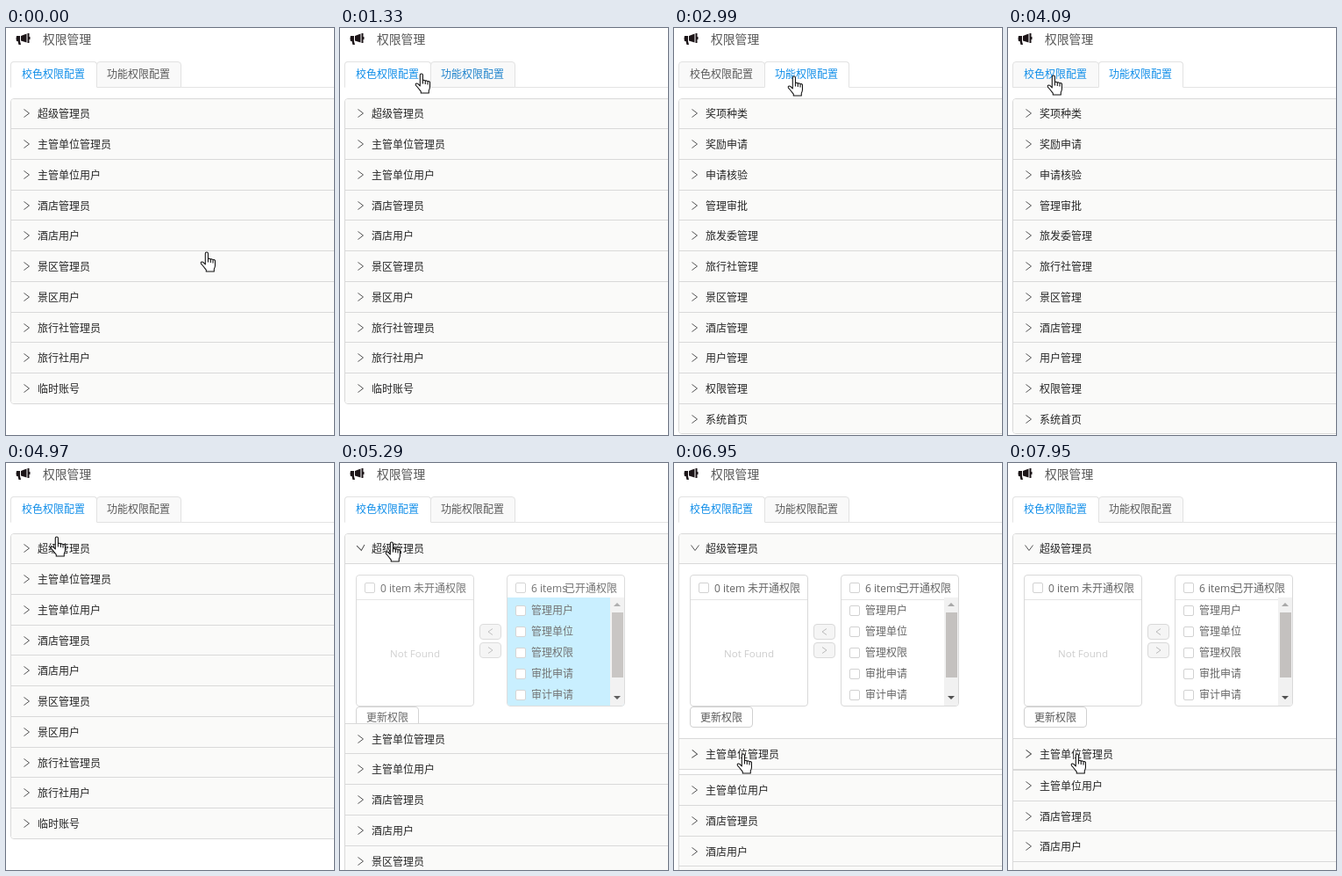
An HTML page for the animation above (8000 ms loop, 374x463 px).

```html
<!DOCTYPE html>
<html lang="zh-CN">
<head>
<meta charset="utf-8">
<title>权限管理</title>
<style>
  html, body { margin: 0; width: 100%; height: 100%; overflow: hidden; background: #fff; }
  body { font: 12px/24px "Open Sans", "Noto Sans CJK SC", "Noto Sans CJK", sans-serif; color: #666; }
  #stage { position: relative; width: 374px; height: 463px; overflow: hidden; }
  #stage div, #stage svg { position: absolute; box-sizing: border-box; white-space: nowrap; }
  svg { overflow: visible; }
  .title { left: 42px; top: 1px; font-size: 13.8px; color: #595959; }
  .rule { left: 5px; top: 67px; width: 369px; height: 1px; background: #e4e4e4; }
  .tab { top: 38px; height: 30px; line-height: 27px; border: 1px solid #e2e2e2; border-radius: 4px 4px 0 0; }
  .panels { left: 5px; top: 80px; width: 380px; border: 1px solid #d9d9d9; border-radius: 4px; overflow: hidden; }
  .row { left: 0; width: 100%; height: 35px; line-height: 33px;
         color: #262626; background: #fafaf9; border-top: 1px solid #d9d9d9; }
  .row .text { left: 30px; }
  .row svg { left: 12px; top: 10px; }
  .body { left: 0; width: 100%; overflow: hidden; background: #fff; border-top: 1px solid #d9d9d9; }
  .list { top: 12px; width: 135px; height: 150px; border: 1px solid #d9d9d9; border-radius: 4px; overflow: hidden; }
  .head { left: 0; top: 0; width: 100%; height: 28px; line-height: 29px; border-bottom: 1px solid #e4e4e4; }
  .head .name { right: 8px; }
  .items { left: 0; top: 25px; right: 0; bottom: 0; }
  .lit .items { background: #c4eeff; }
  .item { left: 0; height: 24px; width: 100%; }
  .label { left: 27px; top: 0; }
  .box { left: 9px; width: 12px; height: 12px; border: 1px solid #d2d2d2; border-radius: 2px; background: #fff; }
  .none { width: 100%; top: 77px; text-align: center; color: #ccc; font-size: 11.6px; }
  .bar { right: 0; top: 25px; width: 16px; bottom: 0; background: #f1f1f1; }
  .thumb { left: 2px; top: 17px; width: 13px; height: 74px; background: #c4c1bf; }
  .move { left: 153px; width: 25px; height: 18px; border: 1px solid #d9d9d9; border-radius: 4px; background: #f5f5f5; }
  .save { left: 12px; top: 162px; width: 72px; height: 24px; line-height: 24px; text-align: center;
          border: 1px solid #d0d0d0; border-radius: 4px; }
</style>
</head>
<body>
<div id="stage">
  <svg width="17" height="14" style="left:11px;top:6px" fill="#1c1518">
    <path d="M1 3h4v6H1q-1-3 0-6zM6 3L12.500.5v10L6 8.500zM2.500 9H5l1 4H3.500zM13.500 0h2v11h-2zM15.500 4h1v3h-1z"/>
  </svg>
  <div class="title">权限管理</div>
  <div class="rule"></div>
</div>
<script>
const LOOP = 8000, ROW = 34.72, TOP = 80, BODY = 199;
const GRAY = [89, 89, 89], BLUE = [16, 142, 233], LINE = [208, 208, 208];

const roles = ['超级管理员', '主管单位管理员', '主管单位用户', '酒店管理员', '酒店用户',
  '景区管理员', '景区用户', '旅行社管理员', '旅行社用户', '临时账号'];
const features = ['奖项种类', '奖励申请', '申请核验', '管理审批', '旅发委管理', '旅行社管理',
  '景区管理', '酒店管理', '用户管理', '权限管理', '系统首页'];
const rights = ['管理用户', '管理单位', '管理权限', '审批申请', '审计申请'];

// Screen refreshes come in bursts: first time, last time, count
const bursts = [[450, 1210, 8], [1330, 1670, 4], [1880, 2570, 7], [2750, 2990, 3],
  [3210, 3990, 8], [4090, 4420, 4], [4630, 5410, 8], [5570, 6300, 8],
  [6400, 6520, 2], [6830, 7170, 4], [7390, 7390, 1], [7840, 7950, 2]];
const ticks = [0];
for (const [a, b, n] of bursts)
  for (let i = 0; i < n; i++) ticks.push(n > 1 ? Math.floor((a + (b - a) * i / (n - 1)) / 10) * 10 : a);
const snap = t => ticks.filter(k => k <= t).pop();

// Pointer path: time, x, y
const path = [[0, 222, 253], [400, 222, 253], [450, 226, 250], [780, 185, 150], [1000, 125, 58],
  [1210, 112, 51], [1300, 97, 50], [1330, 86, 50], [1670, 34, 86], [1800, 34, 86], [2570, 130, 53],
  [2990, 130, 53], [3600, 90, 58], [3990, 46, 53], [4090, 45, 52], [4420, 45, 53], [5070, 52, 88],
  [5290, 52, 88], [5410, 52, 89], [5570, 75, 108], [5880, 247, 165], [6200, 72, 290],
  [6300, 66, 297], [6400, 70, 312], [6520, 72, 326], [6800, 72, 326], [6943, 72, 329], [8000, 72, 329]];

const clamp = v => Math.max(0, Math.min(1, v));
const ramp = (t, from, span) => clamp((t - from) / span);
const ease = p => p < .5 ? 4 * p ** 3 : 1 - 4 * (1 - p) ** 3;
const mix = (a, b, p) => `rgb(${a.map((v, i) => Math.round(v + (b[i] - v) * p))})`;

function pointer(t) {
  const i = Math.max(1, path.findIndex(k => k[0] >= t));
  const [t0, x0, y0] = path[i - 1], [t1, x1, y1] = path[i];
  const p = ramp(t, t0, t1 - t0);
  return [Math.round(x0 + (x1 - x0) * p), Math.round(y0 + (y1 - y0) * p)];
}

const zones = { tab1: [5, 38, 103, 67], tab2: [103, 38, 200, 67], save: [18, 277, 90, 301] };
function over(name, t) {
  const [x, y] = pointer(t), [l, u, r, d] = zones[name];
  return x + 7 >= l && x + 7 < r && y >= u && y < d;
}
// Hover colour fades over the last 200 ms
function heat(name, t) {
  let n = 0;
  for (let k = 0; k < 10; k++) n += over(name, t - k * 20);
  return n / 10;
}

const stage = document.getElementById('stage');
function add(parent, cls, text = '', style = '') {
  const el = document.createElement('div');
  el.className = cls;
  el.textContent = text;
  el.style.cssText = style;
  parent.append(el);
  return el;
}
const arrow = (w, h, d, color) =>
  `<svg width="${w}" height="${h}"><path d="${d}" fill="none" stroke="${color}"/></svg>`;

const tabs = [
  add(stage, 'tab', '校色权限配置', 'left:5px;width:99px;padding-left:12px'),
  add(stage, 'tab', '功能权限配置', 'left:103px;width:97px;padding-left:11px')];
const panels = add(stage, 'panels');
const rows = features.map(() => {
  const el = add(panels, 'row');
  const line = add(el, '', '', 'left:0');
  line.innerHTML = arrow(12, 12, 'M2.500 1.500L8.500 6L2.500 10.500', '#555');
  return { el, line, icon: line.firstChild, label: add(line, 'text') };
});

function addList(parent, left, count, name, items, scroll) {
  const list = add(parent, 'list', '', `left:${left}px`);
  const head = add(list, 'head');
  add(head, 'box', '', 'top:8px');
  add(head, 'label', count);
  add(head, 'name', name);
  if (!items.length) {
    add(list, 'none', 'Not Found');
    return;
  }
  const area = add(list, 'items');
  items.forEach((text, i) => {
    const item = add(area, 'item', '', `top:${i * 24 + 3}px`);
    add(item, 'box', '', 'top:6px');
    add(item, 'label', text);
  });
  if (scroll) {
    const bar = add(list, 'bar');
    bar.innerHTML = '<svg width="16" height="123"><path d="M4 10l4-4 4 4z" fill="#a8a8a8"/>' +
      '<path d="M4 112l4 4 4-4z" fill="#505050"/></svg>';
    add(bar, 'thumb');
  }
}

function addBody(left, right, scroll) {
  const el = add(panels, 'body');
  const inner = add(el, '', '', `left:0;top:0;width:100%;height:${BODY}px`);
  const count = n => n + (n > 1 ? ' items' : ' item');
  addList(inner, 12, count(left.length), '未开通权限', left);
  addList(inner, 184, count(right.length + scroll), '已开通权限', right, scroll);
  add(inner, 'move', '', 'top:68px').innerHTML = arrow(23, 16, 'M14 4.500L9 8L14 11.500', '#bbb');
  add(inner, 'move', '', 'top:89px').innerHTML = arrow(23, 16, 'M9 4.500L14 8L9 11.500', '#bbb');
  const save = add(inner, 'save', '更新权限');
  return { el, inner, save };
}
const bodies = [addBody([], rights, 1), addBody(rights.slice(2), rights.slice(0, 2), 0)];

const cursor = add(stage, '', '', 'width:18px;height:25px');
cursor.innerHTML = `<svg width="18" height="25" fill="#fff" stroke="#111" stroke-width="1.1" stroke-linejoin="round">
  <g transform="translate(-.6 1.200) scale(.98 .95)">
  <path d="M6 15.500V2.400a1.600 1.600 0 0 1 3.200 0V9.500a1.500 1.500 0 0 1 2.900.4a1.500 1.500 0 0 1 2.800.7
  a1.400 1.400 0 0 1 2.500 1.200V17q0 2-1.200 4V24H7V22C5 20 3.500 17 1 14.600C.2 13 2 11.800 3.400 12.800z"/>
  <path d="M9.200 9.500V13M12.100 10V13.500M14.900 11V14"/></g>
  <path d="M7.500.5v16l3.700-3.500 2.400 5.500 2.300-1-2.400-5.300h5z"/></svg>`;
const [hand, plain] = cursor.firstChild.children;

function draw(t) {
  const second = ramp(t, 2700, 250) - ramp(t, 4150, 250);
  [1 - second, second].forEach((on, i) => {
    const s = tabs[i].style;
    s.color = mix(GRAY, BLUE, Math.max(on, heat('tab' + (i + 1), t)));
    s.background = mix([249, 249, 249], [255, 255, 255], on);
    s.borderBottomColor = mix([226, 226, 226], [255, 255, 255], on);
    s.zIndex = on > .5 ? 1 : 0;
  });

  const labels = t >= 2750 && t < 4200 ? features : roles;
  const open = [ease(ramp(t, 5146, 200)), ease(ramp(t, 6900, 200)) - ease(ramp(t, 7772, 200))];
  const [x, y] = pointer(t);
  let at = TOP, onRow = false;
  rows.forEach((row, i) => {
    const p = open[i] || 0, top = Math.floor(at);
    row.label.textContent = labels[i] || '';
    row.el.style.top = top - TOP - 1 + 'px';
    // Text rounds to the nearest pixel while lines round down
    row.line.style.top = Math.round(at + .47) - top + 'px';
    row.icon.style.transform = `rotate(${p * 90}deg)`;
    if (i < labels.length) {
      onRow = onRow || (y >= at && y < at + ROW);
      at += ROW;
    }
    const body = bodies[i];
    if (!body) return;
    const start = Math.floor(at);
    at += p * BODY;
    body.el.style.display = p ? 'block' : 'none';
    body.el.style.top = start - TOP - 1 + 'px';
    body.el.style.height = Math.floor(at) - start + 'px';
    body.inner.style.opacity = p;
    body.inner.className = p < 1 && t < 7200 ? 'lit' : '';
  });
  panels.style.height = Math.floor(at) - TOP + 1 + 'px';

  const glow = open[0] === 1 ? heat('save', t) : 0;
  bodies[0].save.style.color = mix(GRAY, BLUE, glow);
  bodies[0].save.style.borderColor = mix(LINE, BLUE, glow);

  const link = onRow || over('tab1', t) || over('tab2', t) || (open[0] === 1 && over('save', t));
  hand.style.display = link ? '' : 'none';
  plain.style.display = link ? 'none' : '';
  cursor.style.left = x + 'px';
  cursor.style.top = y + 'px';
  cursor.style.zIndex = 2;
}

const begin = performance.now();
function frame() {
  draw(snap((performance.now() - begin) % LOOP));
  requestAnimationFrame(frame);
}
frame();
</script>
</body>
</html>
```
